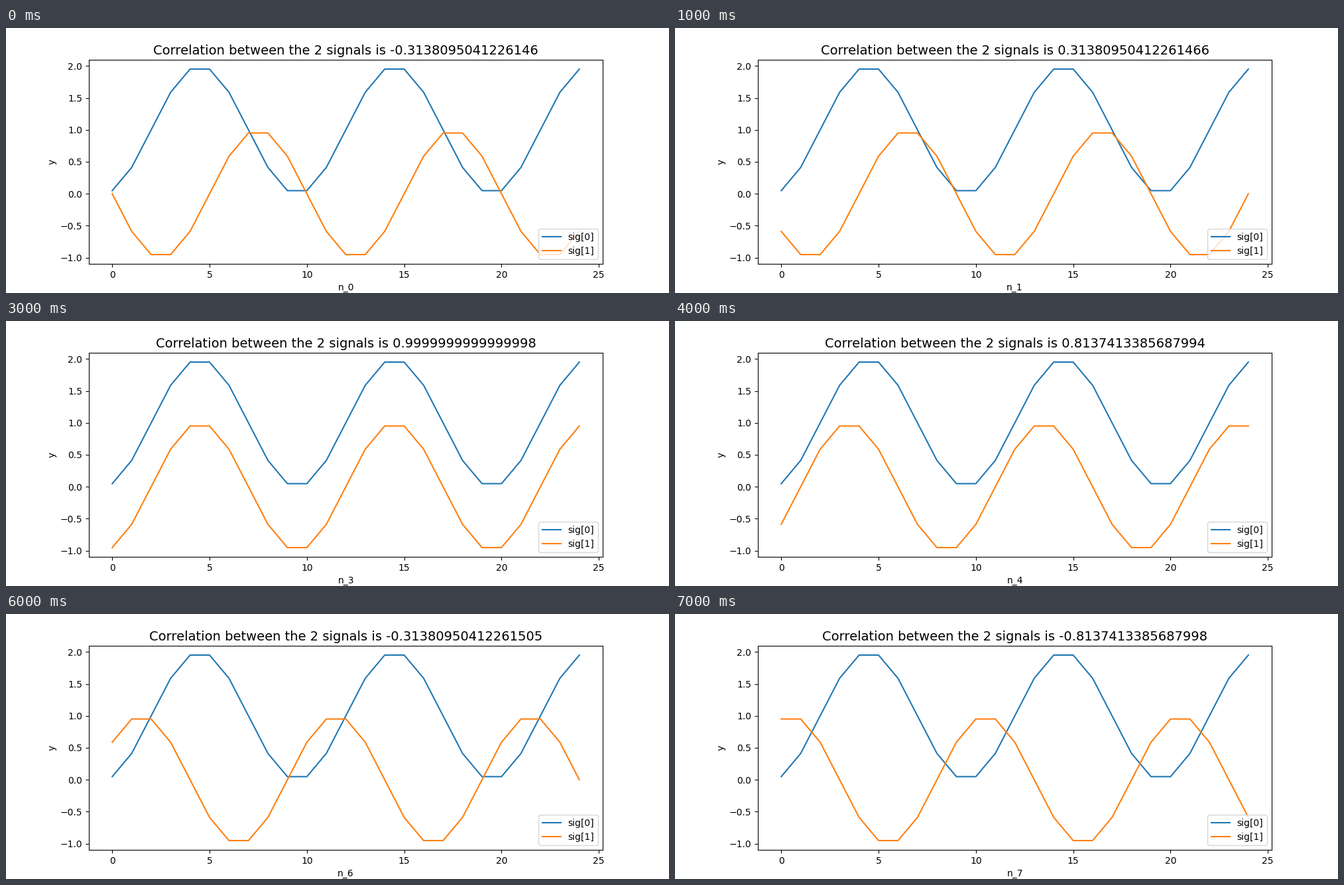
Recreate the animation shown at these times as a matplotlib script. Size 1000 by 400 pixels, loop 8000 ms.

```python
import matplotlib.pyplot as plt
import numpy as np
from matplotlib.animation import FuncAnimation

PERIOD = 10
LAG = 5
N = np.arange(25)

# Correlation of the fixed wave with the sliding one, at full float precision.
CORRELATIONS = [
    "-0.3138095041226146",
    "0.31380950412261466",
    "0.8137413385687998",
    "0.9999999999999998",
    "0.8137413385687994",
    "0.31380950412261466",
    "-0.31380950412261505",
    "-0.8137413385687998",
]


def wave(shift):
    return np.sin(2 * np.pi * (N + shift) / PERIOD)


plt.rcParams["font.family"] = "DejaVu Sans"
fig, ax = plt.subplots(figsize=(10, 4), dpi=100)
ax.plot(N, 1 + wave(-2), label="sig[0]")
sliding, = ax.plot(N, wave(-LAG), label="sig[1]")
ax.set_ylabel("y")
ax.legend(loc="lower right")
title = ax.set_title("", fontsize=14)


def update(step):
    sliding.set_ydata(wave(step - LAG))
    title.set_text(f"Correlation between the 2 signals is {CORRELATIONS[step]}")
    ax.set_xlabel(f"n_{step}")
    return sliding, title


anim = FuncAnimation(fig, update, frames=len(CORRELATIONS), interval=1000,
                     repeat=True, repeat_delay=0, blit=False)
plt.show()
```
